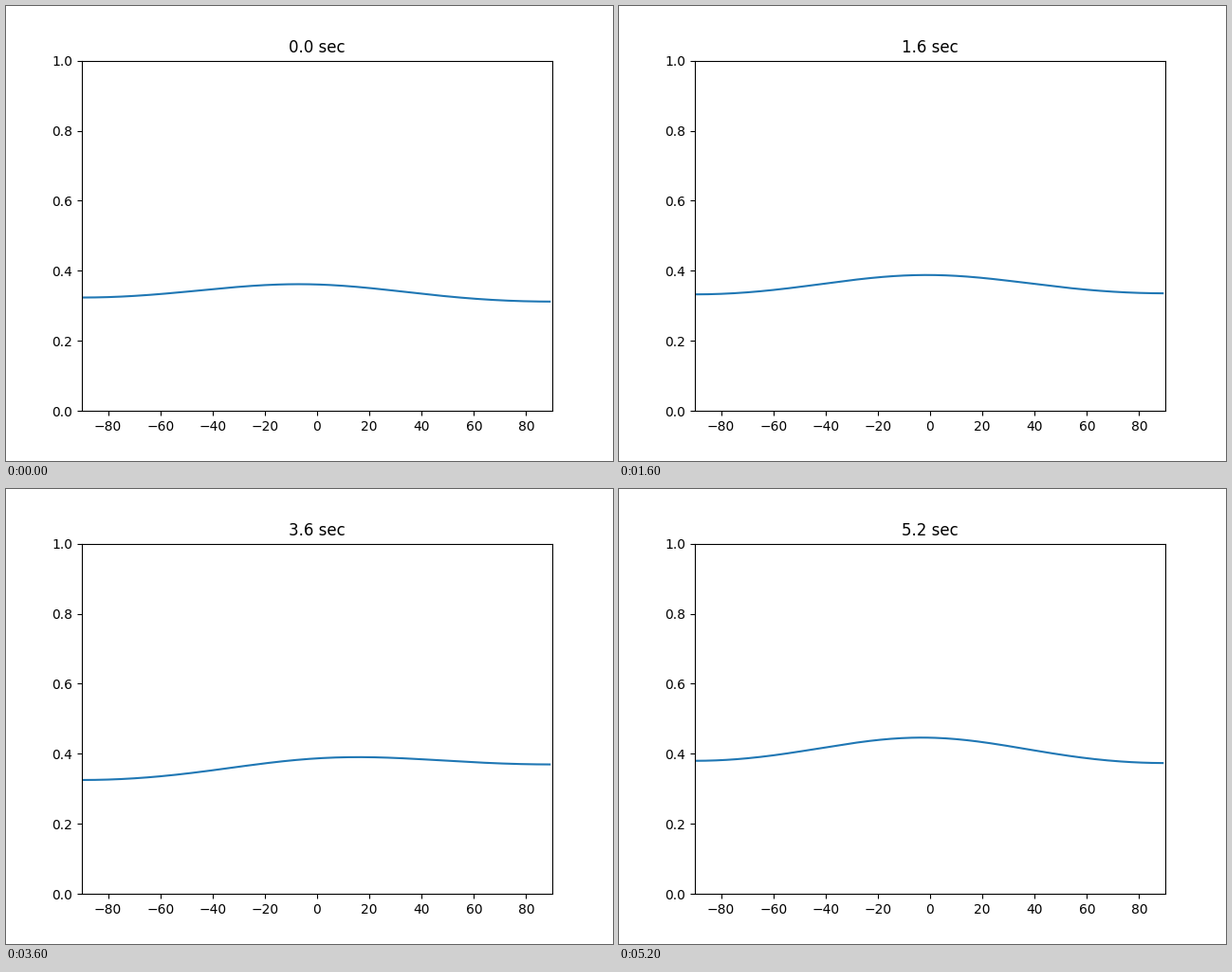
Write a matplotlib script that moves like this. It is 640x480 px and loops after 5400 ms.

```python
import numpy as np
import matplotlib.pyplot as plt
from matplotlib.animation import FuncAnimation

FRAMES = 27
INTERVAL = 200
ROUNDNESS = 1.5

# key poses: seconds, level at 0 degrees, half the rise from left to right end
TIMES, LEVELS, TILTS = zip(
    (0.0, 0.3610, -0.0058),
    (0.4, 0.3745, -0.0012),
    (1.6, 0.3880, 0.0015),
    (2.8, 0.4160, 0.0075),
    (3.6, 0.3870, 0.0222),
    (4.6, 0.4310, -0.0167),
    (5.2, 0.4460, -0.0032),
)

angles = np.arange(-90, 90)
s = np.sin(np.radians(angles))
bump = (1 - np.cos(ROUNDNESS * s)) / (1 - np.cos(ROUNDNESS))


def dip(t):
    """Two brief drops in level early in the loop."""
    return 0.045 * np.sin(np.pi * (np.clip(t, 0.4, 2.8) - 0.4) / 1.2) ** 2


def response(t):
    level = np.interp(t, TIMES, LEVELS) - dip(t)
    tilt = np.interp(t, TIMES, TILTS)
    # the hump grows with the level and flattens as it leans
    bend = 0.29 * level - 0.0587 - 38 * (tilt - 0.003) ** 2
    skew = 0.005 - 0.4 * tilt
    return level + tilt * s - bend * bump + skew * (s**3 - s)


fig, ax = plt.subplots(figsize=(6.4, 4.8), dpi=100)
ax.set_xlim(-90, 90)
ax.set_ylim(0, 1)
line, = ax.plot(angles, response(0))
title = ax.set_title("0.0 sec")


def update(i):
    t = i * INTERVAL / 1000
    line.set_ydata(response(t))
    title.set_text(f"{t:.1f} sec")
    return line, title


anim = FuncAnimation(fig, update, frames=FRAMES, interval=INTERVAL,
                     repeat=True, repeat_delay=0, blit=False)
plt.show()
```
